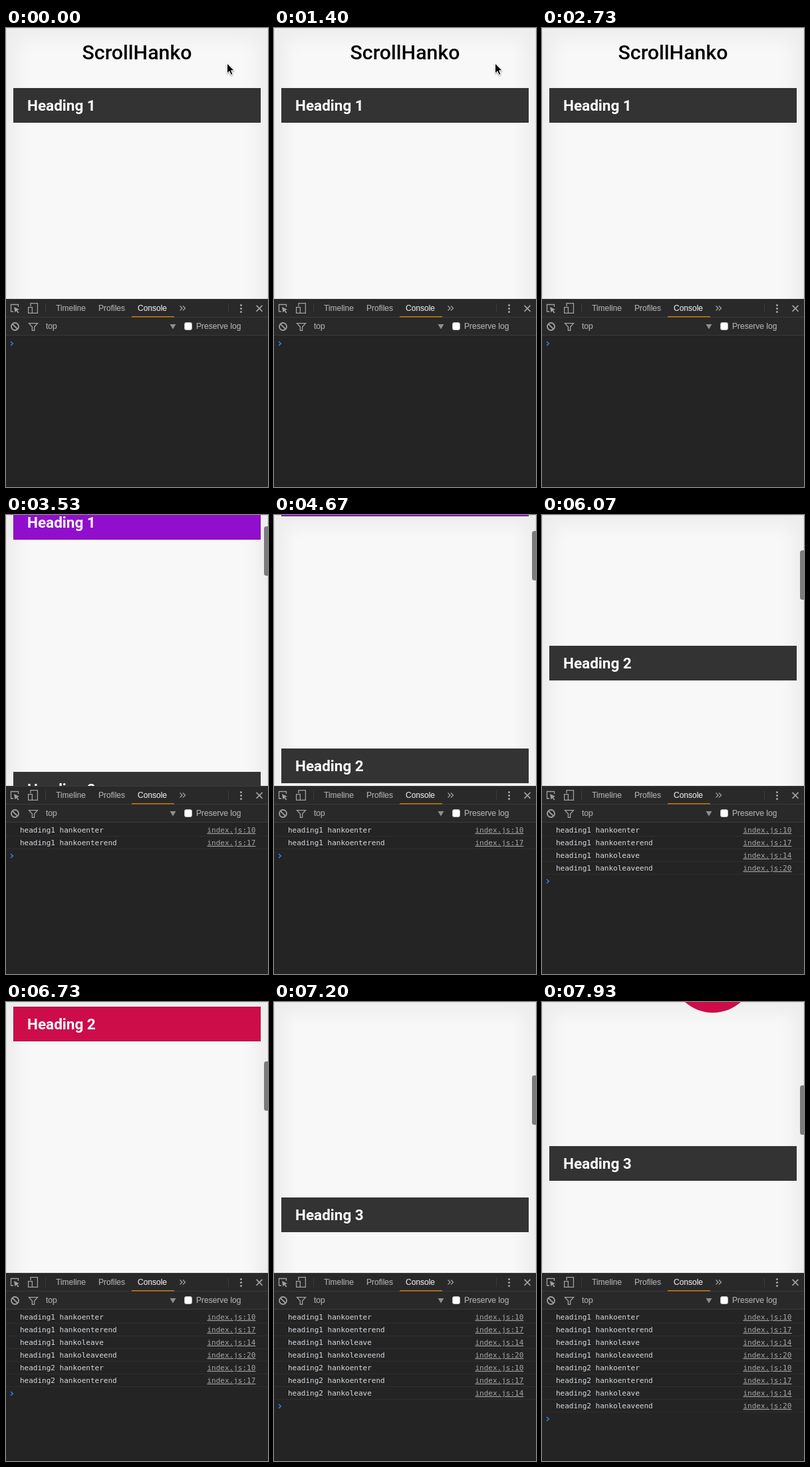
These frames come from a looping animation (394 by 688 pixels, 8 s). An HTML page:

```html
<!DOCTYPE html>
<html lang="en">
<head>
<meta charset="utf-8">
<title>ScrollHanko</title>
<style>
  html, body { margin: 0; width: 100%; height: 100%; overflow: hidden; background: #242424; }
  svg { display: block; width: 100vw; height: 100vh; }
  .title { font: 500 30.3px Roboto, sans-serif; text-anchor: middle; }
  .heading { font: 700 22.5px Roboto, sans-serif; fill: #fff; }
  .ui { font: 12px "Liberation Sans", Arial, sans-serif; fill: #a8a8a8; stroke: #a8a8a8; stroke-width: .2; }
  .ui .on { fill: #ddd; stroke: #ddd; }
  .log { font: 11px "DejaVu Sans Mono", monospace; fill: #d6dbe0; }
  .link { fill: #a6a6a6; text-decoration: underline; }
  .icon { fill: none; stroke: #a0a0a0; stroke-width: 1.3; }
</style>
</head>
<body>
<svg viewBox="0 0 394 688">
  <defs>
    <clipPath id="view"><rect width="394" height="406"/></clipPath>
    <filter id="soft" x="-20%" y="-20%" width="140%" height="140%"><feGaussianBlur stdDeviation="12"/></filter>
  </defs>

  <g clip-path="url(#view)">
    <rect width="394" height="406" fill="#f8f8f8"/>
    <rect width="394" height="500" fill="none" stroke="#000" stroke-width="34" opacity=".045" filter="url(#soft)"/>
    <path d="M.5 406V2.5Q.5.5 2.5.5H391.5Q393.5.5 393.5 2.5V406" fill="none" stroke="#dfdfdf"/>
    <g id="page"><text class="title" x="197" y="47">ScrollHanko</text></g>
    <circle id="stamp" cx="257" r="63" fill="#cd0c4a"/>
    <rect id="thumb" x="388" width="9" height="74" rx="3.5" fill="#7b7b7b"/>
    <path id="cursor" d="M332.5 53V68L336 64.8L338.4 70.3L341 69.2L338.6 63.8H343.2Z"
      stroke="#fff" stroke-width="1" stroke-linejoin="round" style="filter:drop-shadow(0 1px 1px #0006)"/>
  </g>

  <rect y="406" width="394" height="282" fill="#242424"/>
  <rect y="406" width="394" height="54" fill="#292929"/>
  <path d="M0 406.5H394M0 433.5H394M0 460.5H394M59.5 413V427M334.5 413V427" stroke="#3b3b3b"/>
  <path d="M189 432.8H253" stroke="#c47a14" stroke-width="1.6"/>
  <g class="ui">
    <text x="75" y="424">Timeline</text>
    <text x="139" y="424">Profiles</text>
    <text class="on" x="198" y="424">Console</text>
    <text x="60" y="451">top</text>
    <text x="286" y="451">Preserve log</text>
  </g>
  <g class="icon">
    <path d="M11 425H7.5V414.5H18.5V418"/>
    <path d="M12 418L20 422L16.8 423L19.5 426.5L18 427.5L15.5 424L13.5 426.5Z" fill="#a0a0a0" stroke="none"/>
    <path d="M37 417V412.6H47.4V427.4H40M33.6 418.6H39.4V427.4H33.6Z"/>
    <path d="M261.5 416.5L265 420L261.5 423.5M266 416.5L269.5 420L266 423.5"/>
    <path d="M376.5 415.8L385.5 424.8M385.5 415.8L376.5 424.8" stroke-width="1.7"/>
    <circle cx="13.5" cy="447.5" r="5.5" stroke-width="1.8"/>
    <path d="M9.8 443.8L17.2 451.2" stroke-width="1.8"/>
    <path d="M34.5 442.6H47.5L42.6 448V453.4H39.4V448Z"/>
  </g>
  <path d="M246.5 444H255.5L251 451.5Z" fill="#8f8f8f"/>
  <g fill="#a8a8a8"><circle cx="353.5" cy="415.5" r="1.5"/><circle cx="353.5" cy="420.5" r="1.5"/><circle cx="353.5" cy="425.5" r="1.5"/></g>
  <rect x="268.5" y="441.5" width="11" height="11" rx="2.5" fill="#fff" stroke="#bbb"/>
  <g id="console"></g>
  <path id="prompt" d="M7 -3L10.3 0L7 3" fill="none" stroke="#2f7fe6" stroke-width="1.6"/>
</svg>

<script>
const LOOP = 8000, ROW = 19;
const $ = id => document.getElementById(id);
const clamp = v => Math.min(1, Math.max(0, v));

const headings = [
  { y: 90, color: '#910fcc', enter: 3050 },
  { y: 490, color: '#cd0c4a', enter: 6400 },
  { y: 890, color: '#333', enter: Infinity },
];
const events = [['enter', 10], ['enterend', 17], ['leave', 14], ['leaveend', 20]];
const logTimes = [3050, 3300, 4800, 5050, 6400, 6650, 7100, 7350];
const scrollKeys = [[0, 0], [2800, 0], [3530, 105], [4670, 140], [5670, 210], [6730, 483], [7750, 674], [LOOP, 674]];

headings.forEach(({ y, color }, i) => {
  $('page').insertAdjacentHTML('beforeend', `
    <rect x="11" y="${y}" width="372" height="52" fill="#333"/>
    <g class="ink" fill="${color}">
      <rect x="11" y="${y}" width="372" height="52"/>
      <rect x="11.5" y="${y + .5}" width="371" height="51" fill="none" stroke="#000" stroke-opacity=".15"/>
    </g>
    <text class="heading" x="32" y="${y + 34}">Heading ${i + 1}</text>`);
});
const inks = document.querySelectorAll('.ink');

logTimes.forEach((_, i) => {
  const [name, line] = events[i % 4], y = 476 + i * ROW;
  $('console').insertAdjacentHTML('beforeend', `<g class="log">
    <text x="21" y="${y}">heading${i < 4 ? 1 : 2} hanko${name}</text>
    <text class="link" x="302.5" y="${y}">index.js:${line}</text>
    <path d="M0 ${y + 5.5}H394" stroke="#2e2e2e"/></g>`);
});
const rows = [...$('console').children];

// Monotone cubic through the scroll keys
const slope = i => (scrollKeys[i + 1][1] - scrollKeys[i][1]) / (scrollKeys[i + 1][0] - scrollKeys[i][0]);
function tangent(i) {
  if (i === 0 || i === scrollKeys.length - 1) return 0;
  const a = slope(i - 1), b = slope(i);
  return a * b > 0 ? 2 * a * b / (a + b) : 0;
}
function scrollAt(t) {
  const i = scrollKeys.findIndex((key, k) => k && t <= key[0]) - 1;
  const [t0, y0] = scrollKeys[i], [t1, y1] = scrollKeys[i + 1];
  const d = t1 - t0, u = (t - t0) / d, v = 1 - u;
  return y0 * v * v * (1 + 2 * u) + y1 * u * u * (3 - 2 * u)
    + d * u * v * (v * tangent(i) - u * tangent(i + 1));
}

function draw(t) {
  const scroll = Math.round(scrollAt(t));
  $('page').setAttribute('transform', `translate(0 ${-scroll})`);
  inks.forEach((ink, i) => ink.setAttribute('opacity', clamp((t - headings[i].enter) / 250)));

  $('thumb').setAttribute('y', Math.max(2, Math.round(scroll * .19 - 3)));
  $('thumb').setAttribute('opacity', clamp((t - 2800) / 100));
  $('cursor').style.display = t < 1730 ? '' : 'none';
  $('stamp').setAttribute('cy', -47 - 30 * (1 - clamp((t - 7500) / 400)) ** 2);

  const count = logTimes.filter(time => t >= time).length;
  rows.forEach((row, i) => row.style.display = i < count ? '' : 'none');
  $('prompt').setAttribute('transform', `translate(0 ${473 + count * ROW})`);
}

function tick() {
  draw(performance.now() % LOOP);
  requestAnimationFrame(tick);
}
tick();
</script>
</body>
</html>
```
